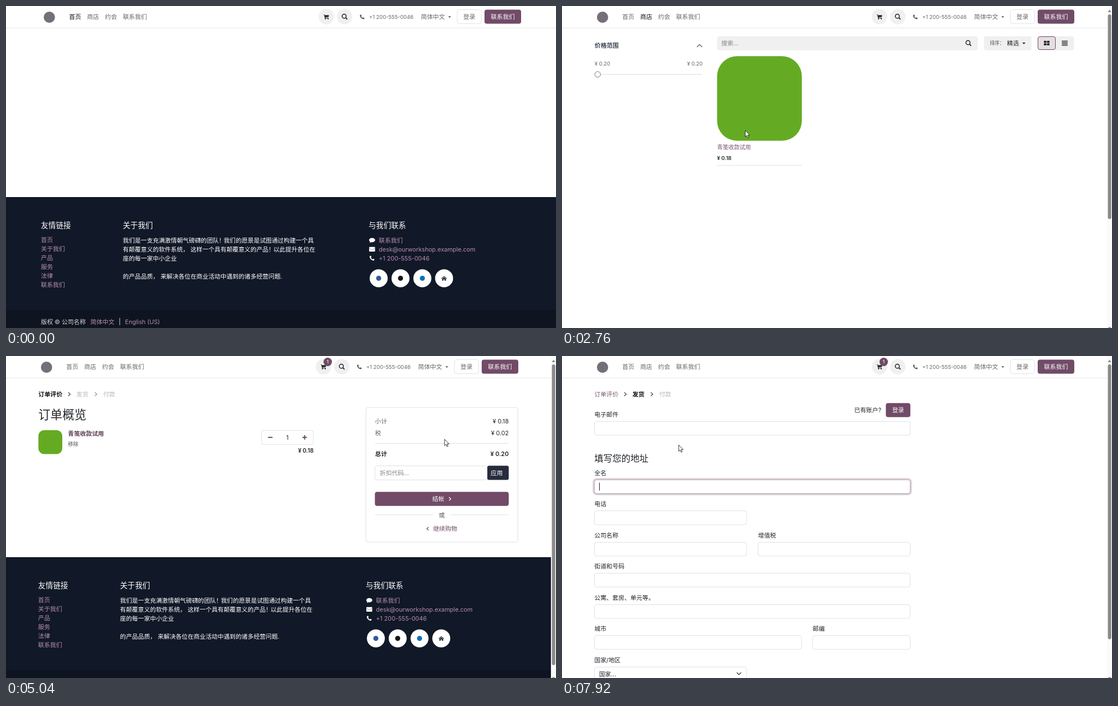
An HTML page that plays this animation: 977 by 573 pixels, repeating every 7990 ms.

```html
<!DOCTYPE html>
<html lang="zh-CN">
<head>
<meta charset="utf-8">
<title>商店</title>
<style>
html, body { margin: 0; width: 100%; height: 100%; overflow: hidden; background: #fff; }
svg { display: block; width: 100vw; height: 100vh; }
text { font-family: Inter, "Noto Sans CJK SC", "Noto Sans CJK", sans-serif; white-space: pre; }
.raised { filter: drop-shadow(0 4px 5px rgba(0, 0, 0, .15)); }
</style>
</head>
<body>
<svg id="stage" viewBox="0 0 977 573" xmlns="http://www.w3.org/2000/svg"></svg>
<script>
const LOOP = 7990;
const PLUM = '#714b67', INK = '#212529', GREY = '#666', LINE = '#dee2e6', NIGHT = '#111827', GREEN = '#64ab23';
const MAUVE = '#b78fae', SOFT = '#f0f0f0', FAINT = '#b5b7ba';
const BASE = 32 / 3, SMALL = 28 / 3;
const PHONE = '+1 200-555-0046', MAIL = 'desk@ourworkshop.example.com', ITEM = '青笺收款试用';

// c is the vertical middle of the text line
const text = (x, c, s, fill = INK, size = BASE, weight = 400, anchor = 'start', extra = '') =>
  `<text x="${x}" y="${(c + size * 0.37).toFixed(2)}" fill="${fill}" font-size="${size.toFixed(2)}" font-weight="${weight}" text-anchor="${anchor}" ${extra}>${s}</text>`;
const rect = (x, y, w, h, fill, r = 0, stroke = 'none', width = 1) =>
  `<rect x="${x}" y="${y}" width="${w}" height="${h}" rx="${r}" fill="${fill}" stroke="${stroke}" stroke-width="${width}"/>`;
const disc = (x, y, r, fill, stroke = 'none') => `<circle cx="${x}" cy="${y}" r="${r}" fill="${fill}" stroke="${stroke}"/>`;
const path = (d, fill, stroke = 'none', w = 1) =>
  `<path d="${d}" fill="${fill}" stroke="${stroke}" stroke-width="${w}" stroke-linejoin="round"/>`;
const hline = (x1, x2, y, c = LINE) => path(`M${x1},${y}H${x2}`, 'none', c);
const move = (x, y, s, k = 1) => `<g transform="translate(${x} ${y}) scale(${k})">${s}</g>`;
const group = (id, s) => `<g id="${id}">${s}</g>`;
const field = (x, y, w, h = 25) => rect(x, y, w, h, '#fff', 4, LINE);
const button = (x, y, w, label, h = 25) =>
  rect(x, y, w, h, PLUM, 4) + text(x + w / 2, y + h / 2, label, '#fff', BASE, 400, 'middle');
const picture = (x, y, size) => rect(x, y, size, size, GREEN, size * 0.235);

const icon = {
  cart: c => path('M-5.2,-4.3H-3.2L-2.9,-3.2H4.9L4.4,0.3L-2.1,1L-1.9,1.9H4.2V2.8H-2.8L-4,-3.4H-5.2Z', c) + disc(-1.8, 4, 1.05, c) + disc(3.4, 4, 1.05, c),
  search: c => `<circle cx="-.8" cy="-.8" r="3.6" fill="none" stroke="${c}" stroke-width="1.5"/>` + path('M1.8,1.8L4.8,4.8', 'none', c, 1.8),
  phone: c => path('M-4.2,-3.7L-2.3,-4.5L-1.1,-1.9L-2.3,-.8Q-1.4,1.3 .8,2.3L1.9,1.1L4.5,2.3L3.8,4.1Q3.1,4.8 1.8,4.5Q-3.3,3.2 -4.6,-1.9Q-4.9,-3.1 -4.2,-3.7Z', c),
  chat: c => `<ellipse cx="0" cy="-.5" rx="5.6" ry="4.1" fill="${c}"/>` + path('M-3.5,2L-4.8,4.8L-.5,3Z', c),
  mail: c => rect(-5.5, -4.3, 11, 8.6, c, 1) + path('M-5.4,-2.3L0,1.4L5.4,-2.3', 'none', '#8a8d93', 0.9),
  house: c => path('M-5.6,0L0,-4.8L5.6,0L4.8,.9L0,-3.1L-4.8,.9ZM-3.8,1L0,-2.1L3.8,1V4.4H1V1.6H-1V4.4H-3.8Z', c),
  minus: c => rect(-4, -1, 8, 2, c),
  plus: c => rect(-4, -1, 8, 2, c) + rect(-1, -4, 2, 8, c),
  right: c => path('M-1.8,-3.4L1.8,0L-1.8,3.4', 'none', c, 1.3),
  left: c => path('M1.5,-2.8L-1.5,0L1.5,2.8', 'none', c, 1.3),
  caret: c => path('M-2.8,-1.3H2.8L0,1.6Z', c),
  grid: c => [-5, .5].map(x => [-4, .5].map(y => rect(x, y, 4.5, 3.5, c)).join('')).join(''),
  list: c => [-4.2, -1.7, .8, 3.3].map(y => rect(-5.2, y, 10.4, 1.3, c)).join('')
};
const put = (name, x, y, c, k) => move(x, y, icon[name](c), k);

function nav(active, dx) {
  const links = ['首页', '商店', '约会', '联系我们'];
  let s = rect(0, 0, 977, 39, '#fff') + hline(0, 977, 39, '#e6e6e6');
  let t = disc(77, 20, 10, '#746f78');
  links.forEach((l, i) => {
    t += text(112 + i * 31.9, 19.3, l, i === active ? '#111' : GREY, BASE, i === active ? 500 : 400, 'start', active === 0 && i === 1 ? 'id="shopLink"' : '');
  });
  t += disc(569, 19, 13.7, SOFT) + put('cart', 569, 19.3, INK, 0.95);
  t += disc(601.5, 19, 13.7, SOFT) + put('search', 601.5, 19, INK);
  t += put('phone', 632.8, 19.3, '#555', 0.9) + text(645, 19.5, PHONE, GREY, SMALL);
  t += text(737, 19.3, '简体中文', GREY) + put('caret', 788, 19.5, '#555', 0.9);
  t += field(801.5, 6.5, 43) + text(823, 19.3, '登录', GREY, BASE, 400, 'middle');
  t += button(850, 6.6, 65, '联系我们');
  return s + move(dx, 0, t);
}

function footer(y, dx, w) {
  let t = text(62, 50, '友情链接', '#fff', 40 / 3) + text(207.5, 50, '关于我们', '#fff', 40 / 3) + text(644, 50, '与我们联系', '#fff', 40 / 3);
  ['首页', '关于我们', '产品', '服务', '法律', '联系我们'].forEach((l, i) => { t += text(62, 76.5 + i * 16, l, MAUVE); });
  [
    [0, '我们是一支充满激情朝气磅礴的团队！<tspan dx="-2">我</tspan>们的愿景是试图通过构建一个具'],
    [1, '有颠覆意义的软件系统， 这样一个具有颠覆意义的产品！<tspan dx="-2">以</tspan>此提升各位在'],
    [2, '座的每一家中小企业'],
    [4, '的产品品质， 来解决各位在商业活动中遇到的诸多经营问题.']
  ].forEach(([row, l]) => { t += text(207.5, 76.7 + row * 16, l, '#fff'); });
  [['chat', '联系我们'], ['mail', MAIL], ['phone', PHONE]].forEach(([n, l], i) => {
    t += put(n, 650.3, 77 + i * 15.8, '#fff', 0.95) + text(662.3, 76.7 + i * 16, l, MAUVE);
  });
  ['#2f5b9d', '#14171a', '#0a70b8'].forEach((c, i) => {
    t += disc(662 + i * 38.8, 144.5, 16, '#fff') + disc(662 + i * 38.8, 144.5, 4.5, c);
  });
  t += disc(778.2, 144.5, 16, '#fff') + put('house', 778.2, 144.7, '#222b38', 0.9);
  const copy = text(62, 222.5, '版权 © 公司名称', '#d5d7db') + text(150, 221.7, '简体中文', MAUVE) +
    rect(201.5, 215, 1, 13, '#ccc') + text(211.5, 221.7, 'English (US)', MAUVE);
  return move(0, y, rect(0, 0, w, 240, NIGHT) + rect(0, 201, w, 40, '#0f1520') + move(dx, 0, t + copy));
}

const scrollbar = end => rect(968, 0, 9, 573, '#fafafa') + rect(969.7, 15, 6, end - 15, '#8a8a8a', 3) +
  path('M969.6,11L972.6,6.5L975.6,11Z', '#8a8a8a') + path('M970,571.5H975.4L972.7,575Z', '#8a8a8a');
const badge = () => disc(571.5, 10.5, 7.5, PLUM) + text(571.5, 10.5, '1', '#fff', 8, 500, 'middle');
const searchBox = (x, w) => rect(x, 53.7, w, 25, SOFT, 4) + text(x + 7.5, 66.3, '搜索...', '#858585') + put('search', x + w - 16.5, 66, INK);
function quantity(x, y, w, split) {
  let s = field(x, y, w) + put('minus', x + 15.5, y + 12.5, PLUM) + text(x + w / 2, y + 12.5, '1', INK, BASE, 400, 'middle') + put('plus', x + w - 15.5, y + 12.5, PLUM);
  if (split) s += path(`M${x + 31},${y}v25M${x + 63},${y}v25`, 'none', LINE);
  return s;
}

const home = () => nav(0, 0) + footer(340, 0, 977);

const shop = () => nav(1, -5) +
  text(58, 70.3, '价格范围', '#374151', BASE, 600) + path('M239.8,73L244.3,68.3L248.8,73', 'none', '#555', 1.2) +
  text(58, 102.3, '¥ 0.20', GREY, SMALL) + text(249.8, 102.3, '¥ 0.20', GREY, SMALL, 400, 'end') +
  hline(68, 249.5, 121.7, '#ddd') + disc(63.4, 121.7, 5, '#fff', '#777') +
  searchBox(275.5, 463) +
  rect(749.5, 53.7, 84.5, 25, SOFT, 4) + text(760, 66.3, '排序：', '#555', 8.6) + text(790.5, 66.3, '精选', INK) + put('caret', 820.5, 66.3, INK) +
  rect(845.5, 53.7, 64, 25, SOFT, 4) + rect(845.5, 54.5, 31, 23, '#e4dee3', 3.5, PLUM) + put('grid', 861, 66, INK) + put('list', 893, 66, INK) +
  picture(275.5, 89.3, 150.5) + text(275.5, 251, ITEM, '#7b5a72', 10) +
  text(275.5, 270.5, '¥ 0.18', INK, SMALL, 600) + hline(275.5, 426, 283.5) + scrollbar(379);

function product() {
  let s = nav(-1, -5) + text(57.5, 67, '所有产品', '#4b5563') + text(105, 67, '/', '#555') + text(114, 67, ITEM, '#5f6368') + searchBox(639, 270.5);
  s += picture(57.5, 95, 416);
  s += text(493.5, 107.5, ITEM, INK, 21.2, 700) + text(493.5, 143, '¥ 0.18', INK, 19.4, 500) + quantity(493.5, 172.5, 93.5, true);
  s += rect(592.5, 172.3, 104, 25, PLUM, 4) + put('cart', 608.7, 185, '#fff', 0.95) + text(621, 185, '添加到购物车', '#fff');
  s += text(493.5, 237, '条款和条件', '#555', BASE, 400, 'start', 'text-decoration="underline"') + text(493.5, 253, '30天退款保证', GREY) + text(493.5, 269, '运输：2-3 个工作日', GREY);
  ['#3b5590', '#111', '#1f66ae', '#46a866', '#a8262c', ''].forEach((c, i) => {
    const x = 680.5 + i * 39;
    s += rect(x, 242.7, 33, 33, '#f8f9fa', 4) + (c ? disc(x + 16.5, 259, 4.5, c) : put('mail', x + 16.5, 259, '#3a3f46'));
  });
  return s + footer(541.5, -5, 968) + scrollbar(425);
}

const notice = () => `<g class="raised">${rect(679, 44, 230.5, 119.5, '#fff', 4, '#d4d4d4')}</g>` +
  text(686.8, 56.8, '项目已添加到您的购物车', INK, SMALL, 500) + hline(679, 909, 69.5, '#ddd') +
  path('M894,52.5L903,61.5M903,52.5L894,61.5', 'none', '#555', 1.1) +
  picture(687, 77, 42.3) + text(741, 84.7, '1 x ' + ITEM, INK, SMALL) + text(901, 84.7, '¥ 0.18', INK, SMALL, 400, 'end') +
  button(687, 130, 214, '查看购物车');

function steps(now) {
  const names = [['订单评价', 57.5], ['发货', 125], ['付款', 172.7]];
  return names.map(([n, x], i) => text(x, 68, n, i === now ? '#111' : i < now ? '#7b5a72' : FAINT, BASE, i === now ? 600 : 400)).join('') +
    put('right', 112.3, 68, '#444') + put('right', 159.5, 68, now ? '#444' : '#999');
}

function cart() {
  let s = nav(-1, -5) + badge() + steps(0) + text(57.5, 104, '订单概览', INK, 64 / 3);
  s += picture(57.5, 132, 42.5) + text(110, 138.5, ITEM, '#5d3f55', BASE, 600) + text(110, 156.5, '移除', '#555', SMALL);
  s += quantity(454, 132.3, 92) + text(546.3, 168.7, '¥ 0.18', INK, 10, 600, 'end');
  s += field(639.3, 91.7, 270, 239.5);
  [['小计', '¥ 0.18', 116], ['税', '¥ 0.02', 137], ['总计', '¥ 0.20', 174.3]].forEach(([a, b, y], i) => {
    const w = i === 2 ? 600 : 400;
    s += text(655.5, y, a, i === 2 ? INK : GREY, BASE, w) + text(893, y, b, INK, BASE, w, 'end');
  });
  s += hline(655.5, 893, 155.5) + field(655.5, 195.5, 200) + text(664, 208.3, '折扣代码...', '#858585');
  s += rect(855, 195.3, 38, 25.3, '#262c3e', 3) + text(861, 208.3, '应用', '#fff');
  s += rect(655.3, 241.7, 237.7, 25, PLUM, 4) + text(757.3, 254.3, '结帐', '#fff', BASE, 500) + put('right', 788.5, 254.3, '#fff', 0.9);
  s += hline(655.5, 758, 282.7) + hline(790, 893, 282.7) + text(774, 283, '或', '#555', BASE, 400, 'middle');
  s += put('left', 749, 307.3, PLUM) + text(758.7, 307.3, '继续购物', PLUM);
  return s + footer(358, -5, 968) + scrollbar(550);
}

function checkout() {
  let s = nav(-1, -5) + badge() + steps(1);
  s += text(519, 96, '已有账户?', INK) + button(575.3, 83.7, 43.5, '登录') + text(57.5, 182.3, '填写您的地址', INK, 16);
  [
    ['电子邮件', 57.5, 104, 561], ['全名', 57.5, 208, 561], ['电话', 57.5, 263.3, 270.5],
    ['公司名称', 57.5, 318.8, 270.5], ['增值税', 348.3, 318.8, 270.3], ['街道和号码', 57.5, 374.2, 561],
    ['公寓、套房、单元等。', 57.5, 429.7, 561], ['城市', 57.5, 485.1, 368], ['邮编', 445.3, 485.1, 173.3], ['国家/地区', 57.5, 540.6, 270.5]
  ].forEach(([label, x, y, w]) => { s += text(x, y, label, INK) + field(x, Math.round(y + 12) + 0.5, w, 24.5); });
  s += text(65.7, 565.7, '国家...', INK) + path('M310.5,563.3L314.3,567L318.1,563.3', 'none', '#343a40', 1.3);
  return s + scrollbar(504);
}

const focus = () => rect(56, 218.7, 564, 27.6, 'none', 5.5, PLUM + '40', 3) +
  rect(57.5, 220.3, 561, 24.5, '#fff', 4, '#b8a5b3') + rect(66, 225.5, 1, 14, '#222');
const status = () => rect(0, 568, 161, 5, '#3b4029') +
  text(3, 574.2, 'https://demo.sample.example/shop/cart', '#aeb59a', 8);

const cursors = {
  arrow: path('M0,0V11.3L2.6,8.9L4.3,13L6.2,12.2L4.5,8.3H8Z', '#fff', '#222', 0.9),
  hand: path('M-1.1,.9Q0,-.6 1.1,.9V6Q2.3,5.2 3.1,6.3Q4.3,5.6 5,6.8Q6.8,6.2 7,8.2V11.5Q6.8,14 5.5,15V16.8H-1V15.2Q-3,12.5 -4.2,10.2Q-4.4,8.6 -2.8,8.9L-1.1,10.4Z', '#fff', '#222', 0.9) +
    path('M1.1,6V9M3.1,6.3V9M5,6.8V9', 'none', '#222', 0.7),
  beam: path('M-2.5,-8H-.7L0,-7.4L.7,-8H2.5M0,-7.4V7.4M-2.5,8H-.7L0,7.4L.7,8H2.5', 'none', '#222', 0.9)
};

const pages = [['home', home, 0], ['shop', shop, 1680], ['product', product, 2900], ['cart', cart, 5040], ['checkout', checkout, 6240]];
const stage = document.getElementById('stage');
stage.innerHTML = rect(0, 0, 977, 573, '#fff') + pages.map(([id, make]) => group(id, make())).join('') +
  group('added', badge() + notice()) + group('focus', focus()) + group('status', status()) +
  group('cursor', Object.keys(cursors).map(k => group(k, cursors[k])).join(''));

const el = id => document.getElementById(id);
const show = (id, on) => { el(id).style.display = on ? '' : 'none'; };
const within = (t, spans) => spans.some(([a, b]) => t >= a && t < b);

// pointer stops: time, x, y
const track = [
  [100, 752, 462], [860, 152, 21], [1070, 153, 24.5], [1680, 153, 24.5], [2420, 324, 214], [2550, 324, 214],
  [2620, 325.5, 221.5], [2830, 325.5, 221.5], [3460, 656, 181], [3590, 656, 181], [3800, 653, 183.3], [4430, 653, 183.3],
  [4700, 798, 142], [4900, 779, 148.2], [5430, 779, 148.2], [5850, 745, 250], [6050, 735, 252], [6240, 661, 227],
  [6500, 546, 212], [6700, 546, 212], [7050, 330, 141], [7450, 130, 222], [7520, 130, 227.5], [7660, 130, 227.5], [7920, 207.3, 158.3]
];
const ease = p => p * p * (3 - 2 * p);
function pointer(t) {
  const i = track.findIndex(k => k[0] > t);
  if (i < 0) return track[track.length - 1].slice(1);
  if (i === 0) return track[0].slice(1);
  const [a, b] = [track[i - 1], track[i]];
  const p = ease((t - a[0]) / (b[0] - a[0]));
  return [1, 2].map(n => a[n] + (b[n] - a[n]) * p);
}

const handSpans = [[790, 1680], [2250, 2740], [4560, 5040], [5720, 6170]];
const beamSpans = [[7000, 7110], [7400, 7720]];
const statusSpans = [[1210, 1480], [2300, 2740], [3430, 4440], [4640, 5040], [5780, 6200]];

function draw(t) {
  pages.forEach(([id, , from], i) => show(id, t >= from && t < (pages[i + 1] ? pages[i + 1][2] : LOOP)));
  el('shopLink').setAttribute('fill', t >= 800 ? '#2b2b2b' : GREY);
  show('added', t >= 3860 && t < 5040);
  show('status', within(t, statusSpans));
  show('focus', t >= 7660);
  el('focus').style.opacity = Math.min(1, Math.max(0, (t - 7640) / 150));
  const kind = within(t, handSpans) ? 'hand' : within(t, beamSpans) ? 'beam' : 'arrow';
  Object.keys(cursors).forEach(k => show(k, k === kind));
  const [x, y] = pointer(t);
  show('cursor', t >= 100);
  el('cursor').setAttribute('transform', `translate(${x.toFixed(2)} ${y.toFixed(2)})`);
}

const start = performance.now();
function tick() {
  draw((performance.now() - start) % LOOP);
  requestAnimationFrame(tick);
}
tick();
</script>
</body>
</html>
```
